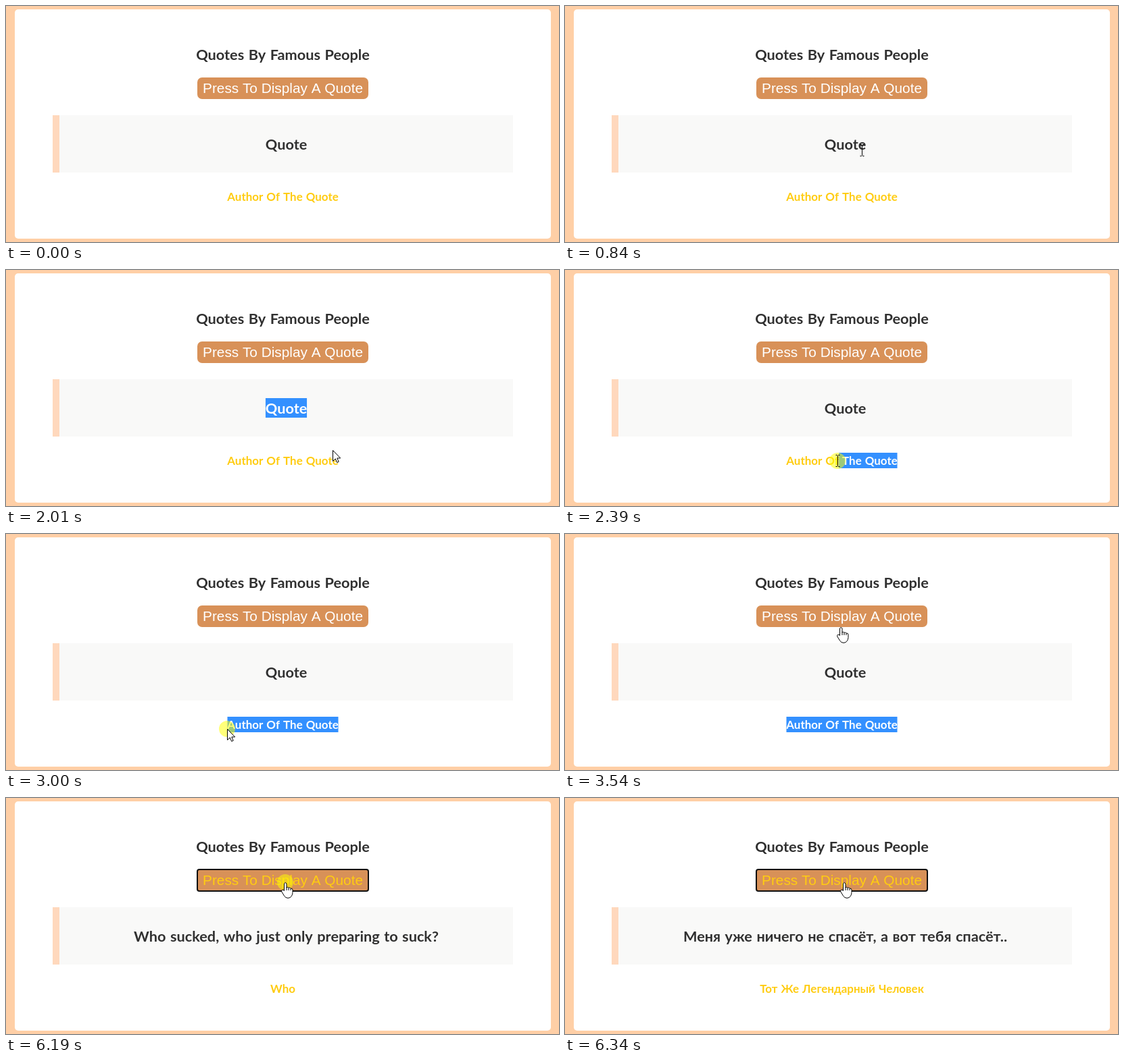
An HTML page with a canvas that plays this animation: 818x350 px, repeating every 8000 ms.

```html
<!DOCTYPE html>
<html lang="en">
<head>
<meta charset="utf-8">
<title>Quotes</title>
<style>
html, body { margin: 0; width: 100%; height: 100%; overflow: hidden; }
canvas { display: block; }
</style>
</head>
<body>
<canvas id="stage" width="818" height="350"></canvas>
<script>
const ctx = document.getElementById('stage').getContext('2d');
const LOOP = 8000, TICK = 77;
const INK = '#303030', GOLD = '#ffcc11', BLUE = '#3390ff', CLAY = '#d89158';

// Pointer path: tick, x, y
const path = [
  [5, 696, 338], [7, 600, 280], [9, 480, 225], [11, 398, 202], [12, 386, 201],
  [15, 386, 201], [16, 396, 201], [18, 453, 207], [19, 454, 208], [21, 460, 222],
  [24, 478, 255], [26, 483, 267], [28, 506, 287], [29, 511, 289], [30, 460, 284],
  [31, 403, 283], [33, 358, 284], [35, 338, 287], [37, 332, 288], [39, 327, 289],
  [40, 327, 287], [42, 338, 262], [44, 380, 190], [46, 408, 138], [48, 409, 132],
  [50, 411, 125], [57, 411, 125], [58, 413, 125]
];

const arrow = new Path2D('M.5 .5V16.5L4.3 13L6.7 18.5L9.2 17.4L6.8 12H11.7Z');
const hand = new Path2D('M-1.5 12.5V1.8Q.2 -.8 2 1.8V8Q3.6 6.5 5 8.3Q6.9 7 8 9.2' +
  'Q10.8 8.5 11 11.2V15.5Q10.7 18.5 9.4 20.5Q7.5 23.4 4 23.4Q.5 23.2 -1.2 20.5' +
  'L-5.2 14Q-5.6 10.6 -3 11.3Z');
const knuckles = new Path2D('M2 7.5V12M5 8.5V12M8 9.5V12');
const beam = new Path2D('M-3 -8.5H-1L0 -7.5L1 -8.5H3M0 -7.5V7.5M-3 8.5H-1L0 7.5L1 8.5H3');

function width(text, font) {
  ctx.font = font;
  return ctx.measureText(text).width;
}

const latoHasCyrillic =
  width('Жёнщ', 'bold 40px Lato, monospace') === width('Жёнщ', 'bold 40px Lato, serif');

function headingFont(text, size) {
  const open = /[а-яё]/i.test(text) && !latoHasCyrillic;
  return open ? `bold ${size * 0.835}px "Open Sans", sans-serif`
              : `bold ${size * 0.905}px Lato, sans-serif`;
}

function makeLine(text, size, cx, base) {
  const font = headingFont(text, size);
  ctx.font = font;
  ctx.wordSpacing = size * 0.05 + 'px';
  const w = ctx.measureText(text).width;
  const left = cx - w / 2;
  const stops = [...text, ''].map((c, i) => left + ctx.measureText(text.slice(0, i)).width);
  ctx.wordSpacing = '0px';
  return { text, size, font, left, right: left + w, base, stops,
    top: Math.round(base - size * 0.952), height: Math.round(size * 1.22) };
}

const quoteLine = text => makeLine(text, 24, 414.5, 213);
const authorLine = text => makeLine(text, 18.72, 409.5, 289);
const title = makeLine('Quotes By Famous People', 24, 409.5, 80);
const pages = [
  [0, 'Quote', 'Author Of The Quote'],
  [4230, 'Who sucked, who just only preparing to suck?', 'Who'],
  [6340, 'Меня уже ничего не спасёт, а вот тебя спасёт..', 'Тот Же Легендарный Человек']
].map(([at, quote, author]) => ({ at, quote: quoteLine(quote), author: authorLine(author) }));

function drawLine(line, color, range) {
  const put = fill => {
    ctx.fillStyle = fill;
    ctx.fillText(line.text, line.left, line.base);
  };
  ctx.font = line.font;
  ctx.wordSpacing = line.size * 0.05 + 'px';
  put(color);
  if (range && range[1] > range[0]) {
    ctx.save();
    ctx.beginPath();
    ctx.rect(range[0], line.top, range[1] - range[0], line.height);
    ctx.clip();
    ctx.fillStyle = BLUE;
    ctx.fillRect(range[0], line.top, range[1] - range[0], line.height);
    put('#fff');
    ctx.restore();
  }
  ctx.wordSpacing = '0px';
}

function box(x, y, w, h, r, fill) {
  ctx.fillStyle = fill;
  ctx.beginPath();
  ctx.roundRect(x, y, w, h, r);
  ctx.fill();
}

const nearest = (stops, x) =>
  stops.reduce((a, b) => Math.abs(b - x) < Math.abs(a - x) ? b : a);

function pointerAt(tick) {
  const i = path.findIndex(p => p[0] > tick);
  if (i < 0) return path[path.length - 1].slice(1);
  const [a, b] = [path[i - 1], path[i]];
  const k = (tick - a[0]) / (b[0] - a[0]);
  return [1, 2].map(n => Math.round(a[n] + (b[n] - a[n]) * k));
}

const over = (line, x, y) =>
  x >= line.left && x <= line.right && y >= line.top && y <= line.top + line.height;

function drawPointer(x, y, page, pressed) {
  if (pressed) {
    ctx.fillStyle = 'rgba(255,255,0,.52)';
    ctx.beginPath();
    ctx.arc(x, y, 12, 0, Math.PI * 2);
    ctx.fill();
  }
  const onButton = x >= 283 && x <= 536 && y >= 106 && y <= 138;
  const onText = [title, page.quote, page.author].some(line => over(line, x, y));
  ctx.save();
  ctx.translate(x, y);
  ctx.lineWidth = 1;
  ctx.strokeStyle = '#000';
  ctx.fillStyle = '#fff';
  if (onText && !onButton) {
    ctx.translate(0.5, 0);
    ctx.stroke(beam);
  } else {
    const shape = onButton ? hand : arrow;
    ctx.fill(shape);
    ctx.stroke(shape);
    if (onButton) ctx.stroke(knuckles);
  }
  ctx.restore();
}

function drawButton(hover, focus) {
  if (focus) {
    box(282, 105, 255, 34, 4, '#101010');
    box(284, 107, 251, 30, 2, CLAY);
  } else {
    box(283, 106, 253, 32, 7, CLAY);
  }
  ctx.font = '20.8px "Liberation Sans", Arial, sans-serif';
  ctx.textAlign = 'center';
  ctx.fillStyle = hover ? GOLD : '#fff';
  ctx.fillText('Press To Display A Quote', 409.5, 129);
  ctx.textAlign = 'left';
}

function draw(t) {
  const tick = Math.floor((t + 5) / TICK);
  const page = pages.filter(p => p.at <= t).pop();
  const [x, y] = tick >= 5 ? pointerAt(tick) : [0, 0];
  const clicked = (t >= 4100 && t < 4230) || (t >= 6190 && t < 6340);
  const dragging = (tick >= 16 && tick <= 18) || (tick >= 29 && tick <= 39);

  let quoteRange, authorRange;
  if (tick >= 16 && tick < 29) {
    const end = tick < 18 ? nearest(page.quote.stops, x) : page.quote.right;
    quoteRange = [page.quote.left, end];
  } else if (tick >= 29 && t < 4100) {
    const start = tick < 37 ? nearest(page.author.stops, x) : page.author.left;
    authorRange = [start, page.author.right];
  }

  ctx.fillStyle = '#ffcfa6';
  ctx.fillRect(0, 0, 818, 350);
  box(13, 5, 793, 340, 5, '#fff');
  box(69, 162, 681, 85, 0, '#f9f9f8');
  box(69, 162, 10, 85, 0, '#ffd8bd');
  drawLine(title, INK);
  drawButton(tick >= 47, t >= 4100);
  drawLine(page.quote, INK, quoteRange);
  drawLine(page.author, GOLD, authorRange);
  if (tick >= 5) drawPointer(x, y, page, clicked || dragging);
}

const begin = performance.now();
function frame() {
  draw((performance.now() - begin) % LOOP);
  requestAnimationFrame(frame);
}
frame();
</script>
</body>
</html>
```
